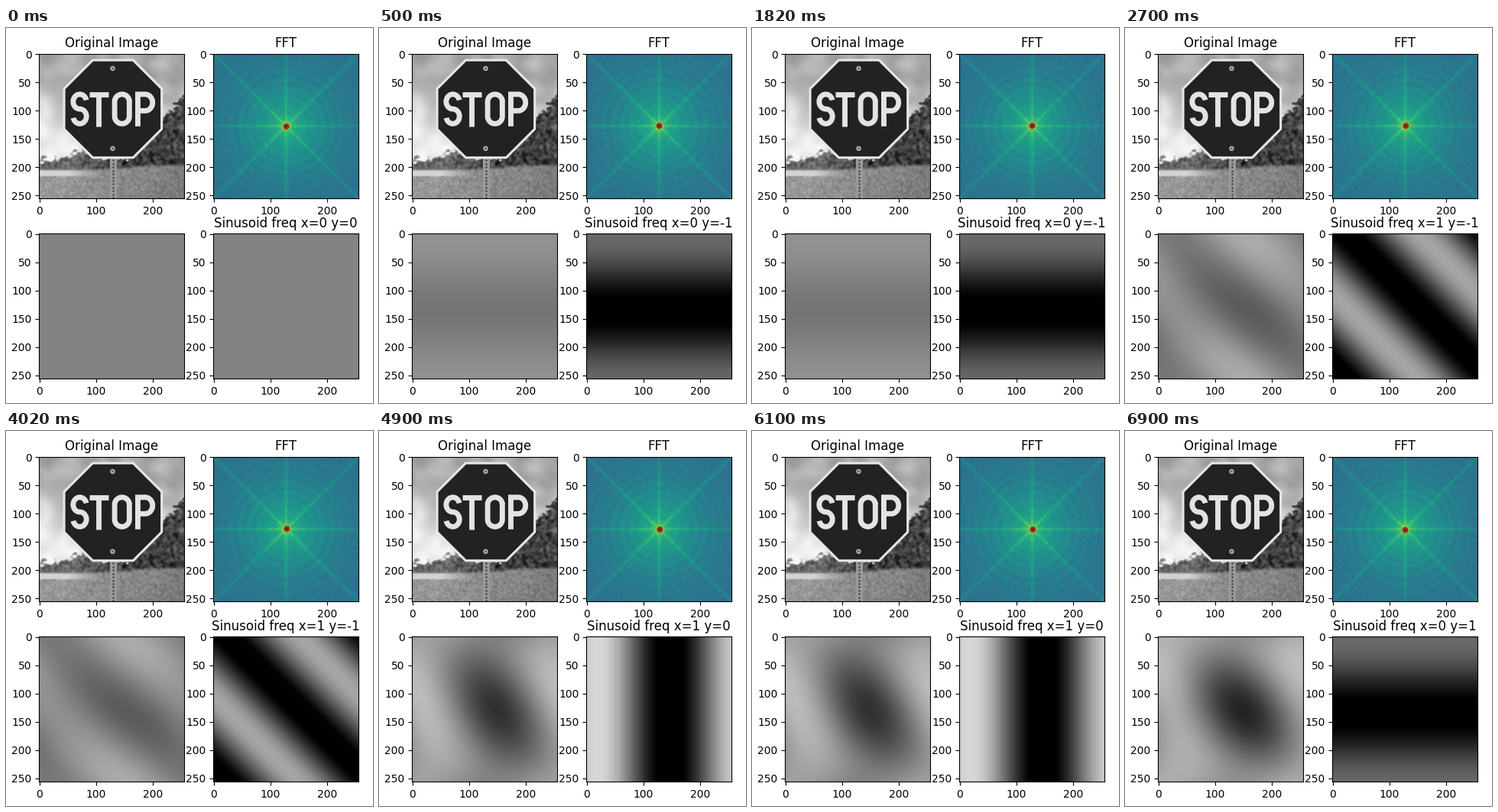
Write a matplotlib script that moves like this. It is 480x491 px and loops after 8 s.

```python
import numpy as np
import matplotlib.pyplot as plt
from matplotlib.animation import FuncAnimation
from matplotlib.patches import Circle, Rectangle, RegularPolygon

W, H, DPI = 480, 491, 100
SIDE = 189.6            # width of each panel in pixels
N = 256
INTERVAL = 100
FRAMES = 80
# start in ms, x frequency, y frequency, phase, amplitude in the sum, peak shown
STEPS = [(0, 0, 0, 0, 0, 131),
         (500, 0, -1, -7, 14, 104),
         (2700, 1, -1, 151, 26, 165),
         (4900, 1, 0, 19, 42, 215),
         (6900, 0, 1, 7, 14, 104)]

rng = np.random.default_rng(4)
yy, xx = np.mgrid[0:N, 0:N].astype(float)


def ramp(values, low, high):
    return np.clip((values - low) / (high - low), 0, 1)


def blurred_noise(passes):
    """Unit-variance noise, smoothed by repeated neighbour averaging."""
    field = rng.normal(size=(N, N))
    for _ in range(passes):
        for axis in (0, 1):
            field = (np.roll(field, 1, axis) + 2 * field + np.roll(field, -1, axis)) / 4
    return field / field.std()


def landscape():
    sky = 166 + 65 * ramp(yy, 50, 135) + 9 * blurred_noise(150)
    hump = 14 * np.exp(-((xx - 82) / 24) ** 2)
    treetop = 186 - hump - 108 * ramp(xx, 150, 252) + 4 * blurred_noise(8)
    leaves = 100 - 36 * ramp(xx, 70, 150) + 15 * blurred_noise(8)
    view = sky + (leaves - sky) * ramp(yy - treetop, -4, 4)
    grass = 150 - 30 * ramp(xx + yy, 280, 500) + 8 * blurred_noise(3)
    field = ramp(-np.abs(yy - 211), -7, -4) * ramp(-xx, -100, -50)
    grass = grass + (212 - grass) * field
    edge = 205 - 8 * ramp(xx, 110, 220)
    return view + (grass - view) * ramp(yy - edge, -3, 3)


def spectrum():
    dx, dy = xx - N / 2, yy - N / 2
    r = np.hypot(dx, dy)
    level = 0.37 + 0.14 * np.exp(-(r / 95) ** 2) + 0.16 * np.exp(-r / 26)
    level += 0.02 * np.cos(r / 2.6) * np.exp(-((r - 75) / 45) ** 2)
    fade = 0.10 + 0.04 * np.exp(-r / 70)
    for angle in np.arange(4) * np.pi / 4:
        distance = np.abs(dx * np.sin(angle) - dy * np.cos(angle))
        level += fade * np.exp(-distance / 2.2)
    return level + 0.042 * rng.normal(size=(N, N))


def panel(left, top, title, data, **style):
    ax = fig.add_axes([left / W, 1 - (top + SIDE) / H, SIDE / W, SIDE / H])
    image = ax.imshow(data, aspect="auto", **style)
    ax.autoscale(False)
    ax.set_xticks(range(0, N, 100))
    ax.set_yticks(range(0, N, 50))
    ax.set_title(title)
    return ax, image


def arc(start, stop):
    t = np.radians(np.linspace(start, stop, 60))
    return np.cos(t), -np.sin(t)


def draw_letters(ax, middle=97.2, w=13, h=26, thick=9.3):
    """Write STOP as thick strokes with half width w and half height h."""
    foot = h + thick / 2

    def stroke(center, x, y):
        ax.plot(center + np.array(x), middle + np.array(y), color="0.89",
                linewidth=thick * SIDE / N * 72 / DPI,
                solid_capstyle="butt", solid_joinstyle="miter")

    upper, lower = arc(12, 270), arc(90, -168)
    stroke(71.5, 0.9 * w * np.append(upper[0], lower[0]),
           h / 2 * np.append(upper[1] - 1, lower[1] + 1))

    stroke(105, [-1.3 * w, 1.3 * w], [-h, -h])
    stroke(105, [0, 0], [-h, foot])

    x, y = arc(5, 370)
    stroke(146, w * x, w * y + (h - w) * np.sign(y))

    x, y = arc(90, -90)
    bowl = 0.56 * h
    stroke(187, np.r_[-w, -w, w * x, -w],
           np.r_[foot, -h, bowl * (y + 1) - h, 2 * bowl - h])


def draw_sign(ax):
    ax.add_patch(Rectangle((125, 180), 10, 80, color="0.6"))
    dots = np.arange(188, N, 6)
    ax.plot(np.full(dots.shape, 130), dots, ".", color="0.25", markersize=1.6)
    for radius, tone in ((95.5, "0.9"), (91, "0.135")):
        ax.add_patch(RegularPolygon((130, 97), 8, radius=radius,
                                    orientation=np.pi / 8, facecolor=tone))
    for y in (25.5, 167):
        ax.add_patch(Circle((129.5, y), 3.4, color="0.72"))
        ax.add_patch(Circle((129.5, y), 1.3, color="0.4"))
    draw_letters(ax)


def build_images():
    """Return the single wave and the running sum for every step."""
    total = np.full((N, N), 131.0)
    waves, sums = [], []
    for _, fx, fy, phase, gain, peak in STEPS:
        shape = np.cos(2 * np.pi * (fx * xx + fy * yy - phase) / N)
        total = total + gain * shape
        waves.append(peak * np.clip((0.85 + shape) / 1.85, 0, 1))
        sums.append(total)
    return waves, sums


plt.rcParams["font.family"] = "DejaVu Sans"
fig = plt.figure(figsize=(W / DPI, H / DPI), dpi=DPI, facecolor="white")
gray = dict(cmap="gray", vmin=0, vmax=255)
waves, sums = build_images()
photo_ax, _ = panel(43.2, 33.7, "Original Image", landscape(), **gray)
draw_sign(photo_ax)
fft_ax, _ = panel(271.4, 33.7, "FFT", spectrum(), cmap="viridis", vmin=0, vmax=1)
_, sum_image = panel(43.2, 269.3, "", sums[0], **gray)
wave_ax, wave_image = panel(271.4, 269.3, "", waves[0], **gray)

ring = fft_ax.add_patch(Circle((N / 2, N / 2), 4.4, facecolor="#d8381e",
                               edgecolor="#b01c10", linewidth=1))
core = fft_ax.add_patch(Circle((N / 2, N / 2), 1.7, color="#5a2a14"))


def update(frame):
    step = sum(frame * INTERVAL >= start for start, *_ in STEPS) - 1
    _, fx, fy, *_ = STEPS[step]
    sum_image.set_data(sums[step])
    wave_image.set_data(waves[step])
    wave_ax.set_title(f"Sinusoid freq x={fx} y={fy}")
    for dot in (ring, core):
        dot.center = (N / 2 + fx, N / 2 + fy)
    return sum_image, wave_image, ring, core


anim = FuncAnimation(fig, update, frames=FRAMES, interval=INTERVAL,
                     repeat=True, repeat_delay=0, blit=False)
plt.show()
```
